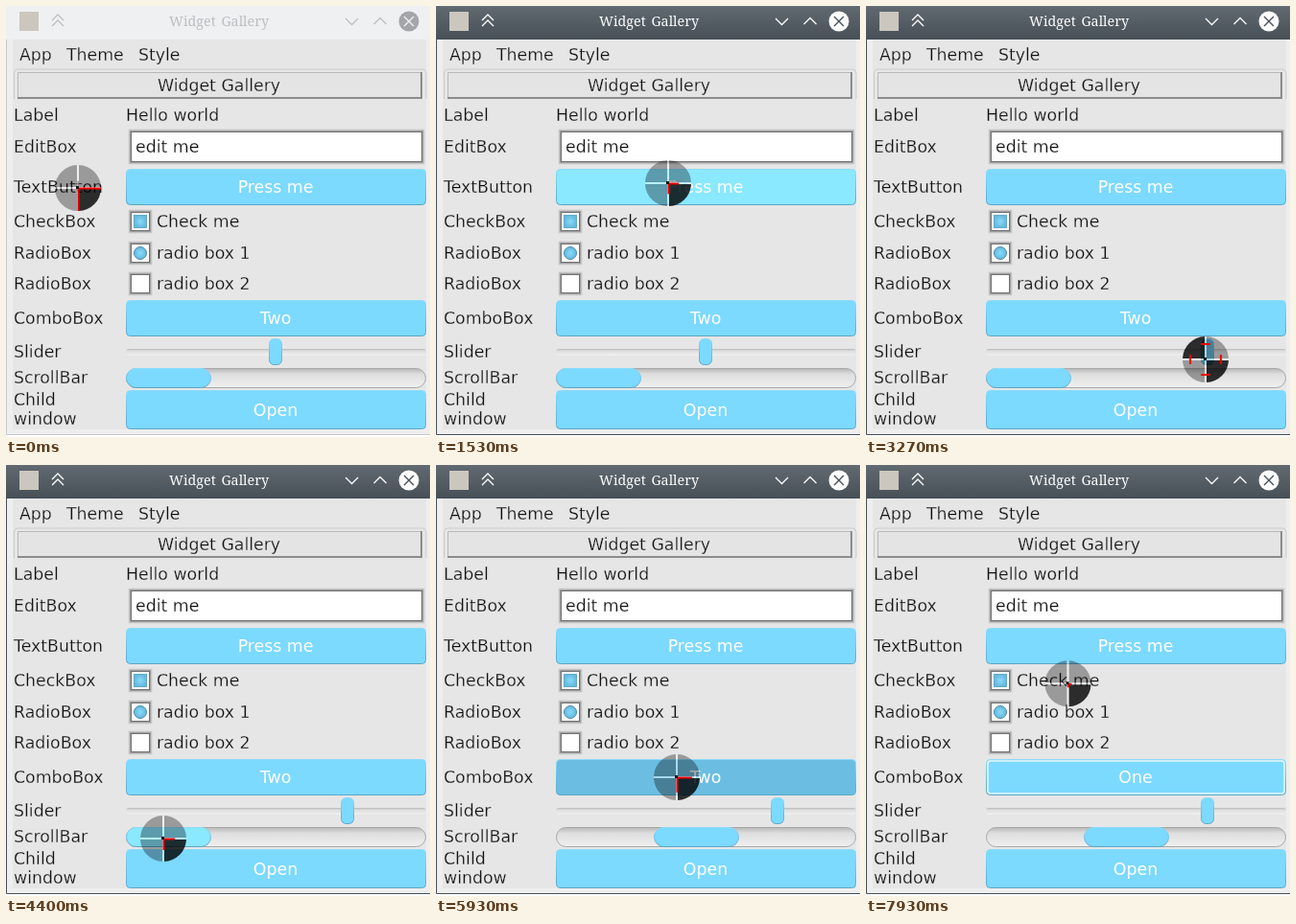
These frames come from a looping animation (442 by 450 pixels, 8 s). An HTML page:

```html
<!DOCTYPE html>
<html lang="en">
<head>
<meta charset="utf-8">
<title>Widget Gallery</title>
<style>
html, body { margin: 0; width: 100%; height: 100%; overflow: hidden; background: #fff; }
svg { display: block; }
/* the pale outline slims the dark letters */
text { font: 17.33px "DejaVu Sans", sans-serif; fill: #111; stroke: #e6e6e6; stroke-width: .3px; white-space: pre; }
.mid { text-anchor: middle; }
.btn text { fill: #fff; stroke: none; }
.title { font: 14.3px "Noto Serif", serif; word-spacing: 2px; stroke: none; }
</style>
</head>
<body>
<svg id="stage" width="442" height="450" viewBox="0 0 442 450">
  <defs>
    <linearGradient id="bar" x2="0" y2="1">
      <stop stop-color="#616a71"/><stop offset="1" stop-color="#475057"/>
    </linearGradient>
    <linearGradient id="edge" x2="0" y2="1">
      <stop stop-color="#8bdcfb"/><stop offset="1" stop-color="#5aa6c8"/>
    </linearGradient>
    <linearGradient id="groove" x2="0" y2="1">
      <stop stop-color="#b8b8b8"/><stop offset=".3" stop-color="#dedede"/><stop offset="1" stop-color="#f0f0f0"/>
    </linearGradient>
    <radialGradient id="blue">
      <stop stop-color="#86dcfc"/><stop offset="1" stop-color="#66b8dc"/>
    </radialGradient>
  </defs>
</svg>
<script>
const stage = document.getElementById('stage');
const NORMAL = '#7cd9ff', HOVER = '#8ae8ff', PRESSED = '#6bbee1';

function add(parent, tag, attrs, content) {
  const el = document.createElementNS('http://www.w3.org/2000/svg', tag);
  set(el, attrs);
  if (content) el.textContent = content;
  return parent.appendChild(el);
}
function set(el, attrs) { for (const k in attrs) el.setAttribute(k, attrs[k]); }
const group = () => add(stage, 'g', {});
const rect = (p, x, y, width, height, fill, more) => add(p, 'rect', { x, y, width, height, fill, ...more });
const line = (p, d, stroke, width = 1) =>
  add(p, 'path', { d, stroke, fill: 'none', 'stroke-width': width });
const label = (p, x, y, s, cls = '') => add(p, 'text', { x, y, class: cls }, s);

function titleBar(fill, ink, disc, cross, border) {
  const g = group();
  rect(g, 0, 0, 442, 35, fill);
  line(g, 'M.5 35V447.5H442', border);
  label(g, 222, 21, 'Widget Gallery', 'title mid').style.fill = ink;
  line(g, 'M48 15l6-6 6 6M48 21l6-6 6 6M354 13l6.5 6.5 6.5-6.5M383.5 19l6.5-6.5 6.5 6.5', ink, 1.3);
  add(g, 'circle', { cx: 420, cy: 16, r: 10.5, fill: disc });
  line(g, 'M415 11l10 10M425 11l-10 10', cross, 1.4);
  return g;
}

function sunken(p, x, y, w, h, fill) {
  ['#dcdcdc', '#c4c4c4', '#a0a0a0', '#727272', fill].forEach((c, i) =>
    rect(p, x + i, y + i, w - 2 * i, h - 2 * i, c, { rx: Math.max(0, 2 - i) }));
}

function button(y, h, caption) {
  const g = add(stage, 'g', { class: 'btn' });
  const face = rect(g, 125.5, y + .5, 312, h - 1, NORMAL, { rx: 4, stroke: 'url(#edge)' });
  return { y, h, face, text: label(g, 281, y + h / 2 + 6, caption, 'mid') };
}

// Window and static widgets
rect(stage, 0, 35, 442, 413, '#eeeeee');
rect(stage, 7, 35, 431, 407, '#e6e6e6');
titleBar('#eff0f1', '#bcbfc1', '#a3a6a8', '#eff0f1', '#c6c9cb');
const active = titleBar('url(#bar)', '#fcfcfc', '#fcfcfc', '#475057', '#475057');
rect(stage, 14, 6, 20, 20, '#cbc7be');

[[14, 'App'], [63, 'Theme'], [138, 'Style']].forEach(([x, s]) => label(stage, x, 57, s));
line(stage, 'M8.5 97V70q0-4 4-4H434q4 0 4 4V97', '#cccccc');
rect(stage, 12, 69, 422, 28, '#e4e4e4');
line(stage, 'M12.5 97V69.5H434', '#b8b8b8');
line(stage, 'M12 96H433V69', '#8c8c8c', 2);
label(stage, 222, 89, 'Widget Gallery', 'mid');

[['Label', 120], ['EditBox', 153], ['TextButton', 195], ['CheckBox', 231], ['RadioBox', 264],
 ['RadioBox', 296], ['ComboBox', 332], ['Slider', 367], ['ScrollBar', 394], ['Child', 417],
 ['window', 437]].forEach(([s, y]) => label(stage, 8, y, s));
label(stage, 125, 120, 'Hello world');
sunken(stage, 127, 128, 310, 38, '#fff');
label(stage, 135, 153, 'edit me');
[['Check me', 231], ['radio box 1', 264], ['radio box 2', 296]].forEach(([s, y]) => {
  sunken(stage, 127, y - 19, 26, 26, '#fff');
  label(stage, 157, y, s);
});
rect(stage, 133.5, 218.5, 13, 13, 'url(#blue)', { stroke: '#62aac8' });
add(stage, 'circle', { cx: 140, cy: 258, r: 6.5, fill: 'url(#blue)', stroke: '#4d8ba6' });

const press = button(170, 38, 'Press me');
const combo = button(307, 38, 'Two');
const open = button(401, 41, 'Open');
const focus = rect(stage, 127, 309, 309, 34, 'none', { rx: 3, stroke: '#e8f8ff', 'stroke-width': 1.5 });

rect(stage, 125, 358, 313, 7, 'url(#groove)', { rx: 3 });
const knob = rect(stage, 0, 347.5, 13, 27, NORMAL, { rx: 5, stroke: 'url(#edge)' });
rect(stage, 125.5, 378.5, 312, 20, 'url(#groove)', { rx: 10, stroke: '#a8a8a8' });
const thumb = rect(stage, 0, 378.5, 88, 20, NORMAL, { rx: 10, stroke: 'url(#edge)' });

// Drop-down list
const popup = group();
rect(popup, 125, 205, 313, 101, '#e6e6e6');
sunken(popup, 127, 207, 310, 98, '#e6e6e6');
const mark = rect(popup, 131, 0, 302, 30, PRESSED);
['One', 'Two', 'Three'].forEach((s, i) => label(popup, 137, 233 + 30 * i, s));

// Dwell pointer: four quadrants around a cross-shaped gap
const R = 24;
const pointer = group();
const quads = [0, 90, 180, 270].map(a => add(pointer, 'path',
  { d: `M1 1H${R}A${R} ${R} 0 0 1 1 ${R}Z`, transform: `rotate(${a})` }));
line(pointer, `M${-R} 0H${R}M0 ${-R}V${R}`, 'rgba(255,255,255,.4)', 2);
const red = line(pointer, '', '#f00000', 2);
rect(pointer, -2, -2, 3, 3, '#111');

// Pointer stops: the time it sets off, arrives and fires, and the place
const STOPS = [
  { off: -1, there: 0, fire: 270, x: 75, y: 190 },
  { off: 270, there: 1070, fire: 1930, x: 242, y: 185 },
  { off: 2070, there: 2500, fire: 2930, x: 280, y: 358 },
  { off: 2930, there: 3170, fire: 3470, x: 354, y: 369, drag: true },
  { off: 3800, there: 4200, fire: 4600, x: 164, y: 390 },
  { off: 4600, there: 5270, fire: 5530, x: 250, y: 392, drag: true },
  { off: 5670, there: 5830, fire: 6130, x: 251, y: 326 },
  { off: 6270, there: 6930, fire: 7670, x: 240, y: 225 },
  { off: 7800, there: 8600, fire: 9000, x: 60, y: 245 },
];
const share = (t, a, b) => Math.min(1, Math.max(0, (t - a) / (b - a)));
const mix = (a, b, u) => a + (b - a) * u;
const show = (el, on) => el.setAttribute('visibility', on ? 'visible' : 'hidden');
const travel = (t, s) => share(t, s.off, s.there);

function draw(t) {
  const i = STOPS.findLastIndex(s => t >= s.off);
  const stop = STOPS[i], from = STOPS[i - 1] || stop, u = travel(t, stop);
  const x = mix(from.x, stop.x, u), y = mix(from.y, stop.y, u);
  // the red marks refill on the way and run out while dwelling
  const reach = R * (u < 1 && !stop.drag ? u : 1 - share(t, stop.there, stop.fire));
  const drag = stop.drag && t < stop.fire;
  const sliding = drag && i === 3, scrolling = drag && i === 5;
  const listed = t >= 6130 && t < 7670;
  const over = (x0, y0, w, h) => x >= x0 && x < x0 + w && y >= y0 && y < y0 + h;
  const tint = (el, hover, down) => el.setAttribute('fill', down ? PRESSED : hover ? HOVER : NORMAL);

  active.setAttribute('opacity', share(t, 1270, 1470));
  for (const b of [press, combo, open])
    tint(b.face, !drag && !listed && over(125, b.y, 313, b.h), b === combo && t >= 5830 && t < 7670);
  combo.text.textContent = t < 7670 ? 'Two' : 'One';
  show(focus, t >= 7670);

  const mid = mix(281, 356, travel(t, STOPS[3]));
  knob.setAttribute('x', mid - 6.5);
  tint(knob, over(mid - 7, 347, 14, 28), sliding);
  const left = mix(125, 227, travel(t, STOPS[5]));
  thumb.setAttribute('x', left + .5);
  tint(thumb, over(left, 378, 89, 21), scrolling);

  show(popup, listed);
  mark.setAttribute('y', 211 + 30 * Math.min(2, Math.max(0, Math.floor((y - 211) / 30))));

  pointer.setAttribute('transform', `translate(${x} ${y})`);
  quads.forEach((q, k) =>
    q.setAttribute('fill', `rgba(0,0,0,${k === 0 || drag && k === 2 ? .81 : .33})`));
  red.setAttribute('d', drag
    ? `M-5 ${-reach}H5M-5 ${reach}H5M${-reach}-5V5M${reach}-5V5`
    : `M.5 ${reach}V.5H${reach}`);
}

const start = performance.now();
function tick() {
  draw((performance.now() - start) % 8000);
  requestAnimationFrame(tick);
}
tick();
</script>
</body>
</html>
```
